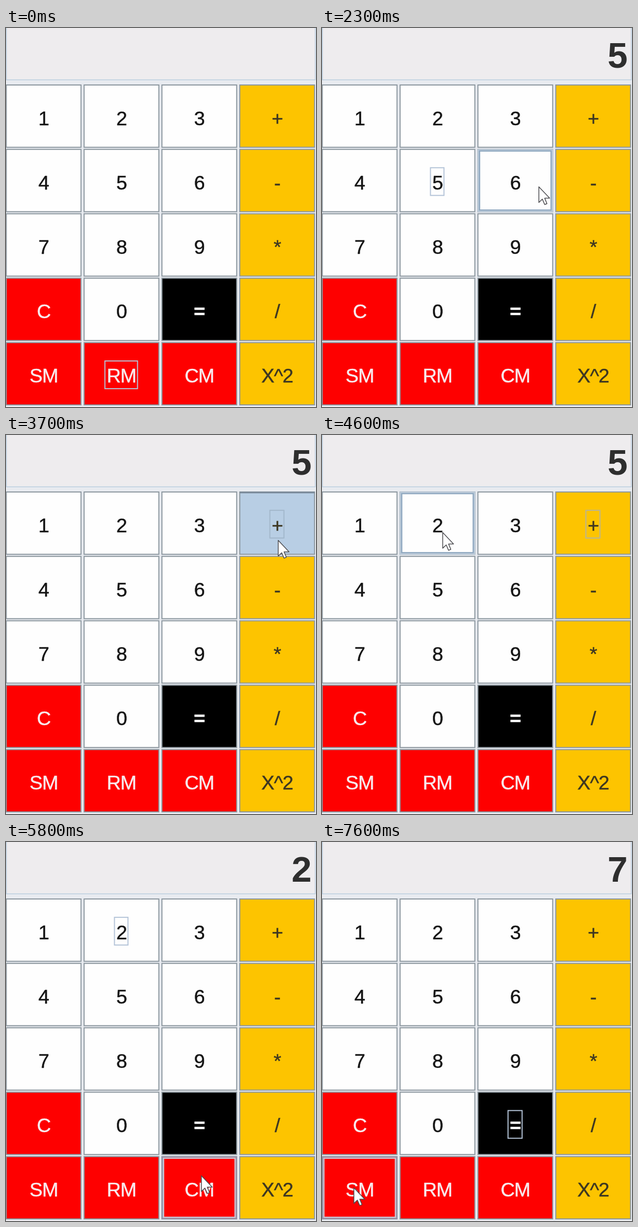
An HTML page for the animation above (8000 ms loop, 593 by 725 pixels).

```html
<!DOCTYPE html>
<html lang="en">
<head>
<meta charset="utf-8">
<title>Calculator</title>
<style>
  html, body { margin: 0; width: 100%; height: 100%; overflow: hidden; background: #e8ebf0; }
  svg { display: block; width: 593px; height: 725px; }
  text { font-family: "Liberation Sans", Arial, sans-serif; font-size: 37.5px; text-anchor: middle; }
  #keys { filter: blur(.5px); }
  #keys text { letter-spacing: -1px; stroke: currentColor; stroke-width: .5px; fill: currentColor; }
  .face { stroke: #8c979f; stroke-width: 2; }
  .num { color: #151515; }
  .num .face { fill: #fefefe; }
  .op { color: #3d3722; }
  .op .face { fill: #fdc400; }
  .mem { color: #f8eaee; }
  .mem .face { fill: #fe0000; }
  .eq { color: #fff; }
  .eq .face { fill: #000; }
  .eq text { font-weight: bold; }
  .ring, .rim, .focus, .shade { fill: none; visibility: hidden; }
  .rim { stroke: #bccbda; stroke-width: 2.4; }
  .ring { stroke: #8fa8c0; stroke-width: 2.6; }
  .mem .rim { stroke: #8f93a8; }
  .mem .ring { stroke: #c4c8d8; }
  .focus { stroke: #b4c4d8; stroke-width: 2; }
  .op .focus { stroke: #b9b596; }
  .shade { stroke: #7a8a99; stroke-width: 3; }
  .hover .rim, .hover .ring, .focused .focus, .pressed .shade { visibility: visible; }
  .pressed .face { fill: #b8cee4; }
  .pressed .rim, .pressed .ring { visibility: hidden; }
  .pressed .focus { stroke: #a3b8cc; }
  #display { font-size: 69px; font-weight: bold; text-anchor: end; fill: #2e2e2e; }
</style>
</head>
<body>
<svg viewBox="0 0 593 725">
  <rect x=".8" y="-4" width="590.8" height="103.2" fill="#eeecee" stroke="#bed0e0" stroke-width="1.6"/>
  <text id="display" x="584.5" y="75.5"></text>
  <g id="keys"></g>
  <path id="cursor" d="M0 0V30L6.7 23.6L11.2 34L15.5 32.2L11.2 21.8H20.7Z"
        fill="#fff" stroke="#4c4c50" stroke-width="1.5" stroke-linejoin="round"/>
</svg>
<script>
const LOOP = 8000, STEP = 100, HOLD = 200;
const ROWS = ['1 2 3 +', '4 5 6 -', '7 8 9 *', 'C 0 = /', 'SM RM CM X^2'];
const LABELS = ROWS.join(' ').split(' ');
const PITCH_X = 148.9, PITCH_Y = 123.2, KEY_W = 143, KEY_H = 119.2;

// The pointer reaches each key after `travel` ms, may sag below the straight line, and may click
const VISITS = [
  { key: '9', at: 800, dx: 55, dy: 33 },
  { key: '-', at: 900, travel: 100, dx: -65, dy: 36 },
  { key: '5', at: 1200, travel: 100, dx: 25, dy: 2, press: 1700 },
  { key: '6', at: 2300, travel: 100, dx: 45, dy: 12 },
  { key: '-', at: 2700, travel: 400, dx: 12, dy: 36, sag: 20 },
  { key: '+', at: 3300, travel: 500, dx: 2, dy: 33, press: 3700 },
  { key: '2', at: 4600, travel: 500, dx: 10, dy: 18, sag: 125, press: 4800 },
  { key: 'CM', at: 5800, travel: 700, dx: 4, dy: -23 },
  { key: '=', at: 6200, travel: 200, dx: 2, dy: 15, press: 6300 },
  { key: '/', at: 6600, travel: 100, dx: -48, dy: 22 },
  { key: 'SM', at: 7600, travel: 600, dx: -11, dy: 0, sag: 30 }
];

const keysLayer = document.getElementById('keys');
const display = document.getElementById('display');
const cursor = document.getElementById('cursor');

function make(parent, name, attrs) {
  const el = document.createElementNS('http://www.w3.org/2000/svg', name);
  for (const key in attrs) el.setAttribute(key, attrs[key]);
  return parent.appendChild(el);
}

// Rectangle around a centre point
function box(g, cls, cx, cy, width, height) {
  make(g, 'rect', { class: cls, x: cx - width / 2, y: cy - height / 2, width, height });
}

function kind(label) {
  if (label === '=') return 'eq';
  if (/^\d$/.test(label)) return 'num';
  return /^[A-Z]+$/.test(label) ? 'mem' : 'op';
}

function centre(label) {
  const i = LABELS.indexOf(label);
  return [72 + PITCH_X * (i % 4), 168.6 + PITCH_Y * Math.floor(i / 4)];
}

function keyAt(x, y) {
  const col = Math.floor(x / PITCH_X), row = Math.floor((y - 107) / PITCH_Y);
  return LABELS[row * 4 + col];
}

const keys = LABELS.map(label => {
  const [cx, cy] = centre(label);
  const g = make(keysLayer, 'g', { class: kind(label) });
  box(g, 'face', cx, cy, KEY_W, KEY_H);
  box(g, 'rim', cx, cy, KEY_W - 1, KEY_H - 1);
  box(g, 'ring', cx, cy, KEY_W - 6, KEY_H - 6);
  make(g, 'path', { class: 'shade', d: `M${cx - KEY_W / 2} ${cy - KEY_H / 2 + 1}h${KEY_W}` });
  const text = make(g, 'text', { x: cx, y: cy + 17 });
  text.textContent = label;
  box(g, 'focus', cx - .5, cy + 2, text.getComputedTextLength() + 6, 53);
  return { label, g };
});

function spot({ key, dx, dy }) {
  const [x, y] = centre(key);
  return [x + dx, y + dy];
}

function pointerAt(t) {
  const next = VISITS.findIndex(v => v.at > t);
  if (next === 0) return null;
  if (next < 0) return spot(VISITS[VISITS.length - 1]);
  const { at, travel, sag = 0 } = VISITS[next];
  const [x0, y0] = spot(VISITS[next - 1]), [x1, y1] = spot(VISITS[next]);
  const k = Math.max(0, 1 - (at - t) / travel);
  return [x0 + (x1 - x0) * k, y0 + (y1 - y0) * k + sag * Math.sin(Math.PI * k)];
}

// Replays the clicks made so far, as the calculator would
function calculator(t) {
  const state = { focus: 'RM', pressed: '', shown: '' };
  let sum = 0;
  for (const { key, press } of VISITS) {
    if (!press || t < press) continue;
    state.focus = key;
    if (t < press + HOLD) state.pressed = key;
    else if (key === '+') sum = +state.shown;
    else if (key === '=') state.shown = String(sum + +state.shown);
    else state.shown = key;
  }
  return state;
}

function draw(t) {
  const pos = pointerAt(t);
  const hover = pos && keyAt(...pos);
  const { focus, pressed, shown } = calculator(t);
  cursor.style.visibility = pos ? 'visible' : 'hidden';
  if (pos) cursor.setAttribute('transform', `translate(${pos})`);
  for (const { label, g } of keys) {
    g.classList.toggle('hover', label === hover);
    g.classList.toggle('focused', label === focus);
    g.classList.toggle('pressed', label === pressed);
  }
  display.textContent = shown;
}

const start = performance.now();
function tick() {
  const t = (performance.now() - start) % LOOP;
  draw(Math.floor(t / STEP) * STEP);
  requestAnimationFrame(tick);
}
tick();
</script>
</body>
</html>
```
